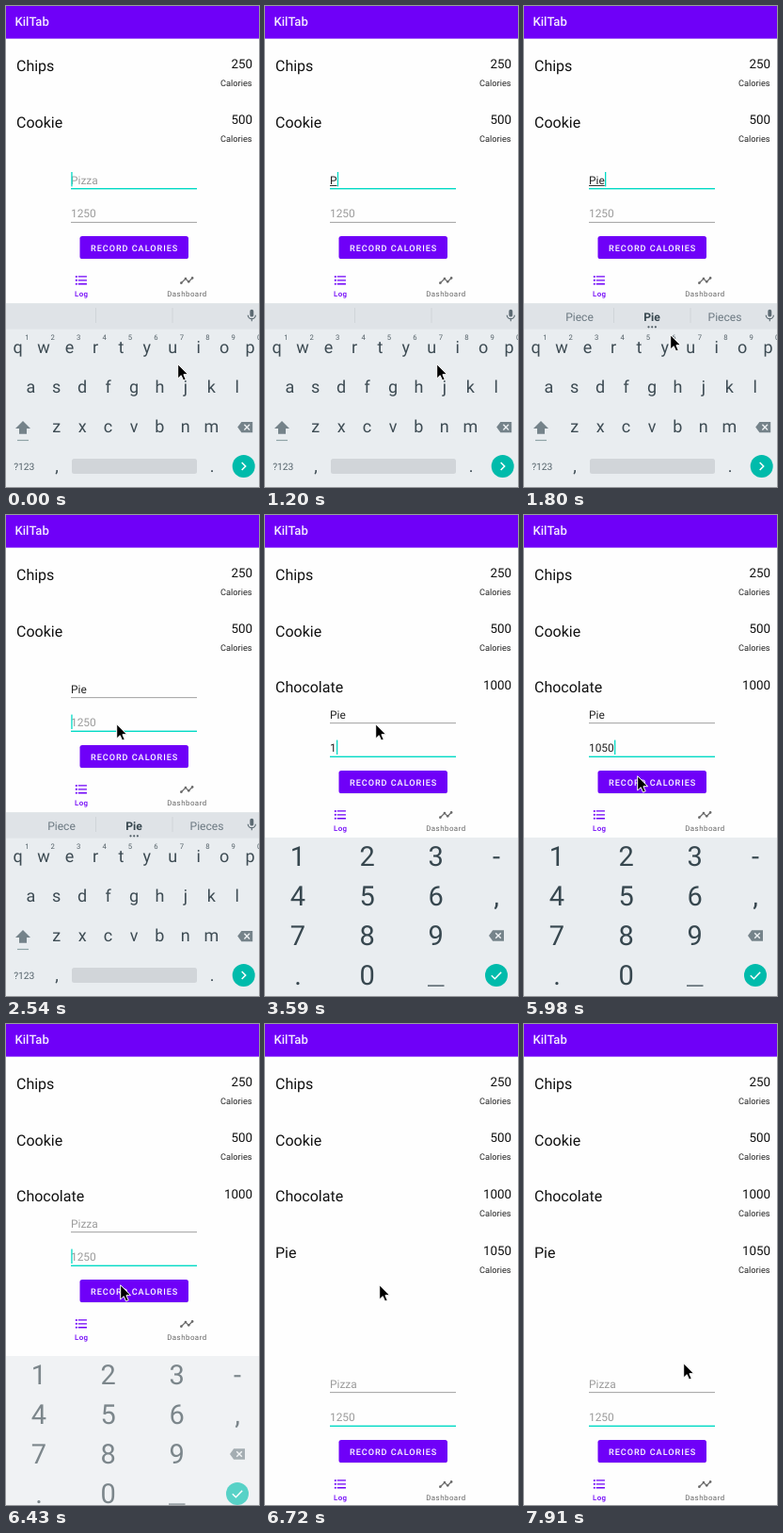
An HTML page that plays this animation: 269 by 510 pixels, repeating every 8000 ms.

```html
<!DOCTYPE html>
<html lang="en">
<head>
<meta charset="utf-8">
<title>Calorie log</title>
<style>
  html, body { margin: 0; width: 100%; height: 100%; overflow: hidden; background: #fefefe; }
  svg { display: block; width: 100vw; height: 100vh; font-family: Roboto, sans-serif; }
  text { white-space: pre; text-rendering: geometricPrecision; }
  .mid { text-anchor: middle; }
  .end { text-anchor: end; }
  .title { font-size: 13.1px; font-weight: 500; fill: #f4eaff; }
  .food { font-size: 16px; fill: #111; }
  .count { font-size: 13.4px; fill: #111; }
  .unit { font-size: 9.2px; fill: #222; }
  .entry { font-size: 11.9px; fill: #222; }
  .entry.hint { fill: #9b9b9b; }
  .action { font-size: 9.15px; font-weight: 500; letter-spacing: .95px; fill: #fff; }
  .tab { font-size: 7.9px; letter-spacing: .48px; fill: #666; }
  .tab.on { font-weight: 500; letter-spacing: .38px; fill: #6f00f8; }
  .key { font-size: 18px; fill: #3d4b53; }
  .sup { font-size: 7.7px; fill: #536067; }
  .sym { font-size: 10.3px; fill: #55636b; }
  .digit { font-size: 29px; fill: #37474f; }
  .sug { font-size: 12.1px; fill: #6c7982; }
  .sug.best { font-weight: 700; fill: #37474f; }
</style>
</head>
<body>
<svg viewBox="0 0 269 510" preserveAspectRatio="none">
  <defs>
    <g id="erase">
      <path d="M-8 0L-3.8-5.7H8V5.7H-3.8Z" fill="#75838a"/>
      <path d="M-.8-2.8L4.8 2.8M4.8-2.8L-.8 2.8" stroke="#eef1f3" stroke-width="1.4"/>
    </g>
  </defs>
  <rect width="269" height="510" fill="#fefefe"/>
  <g id="list"></g>
  <rect width="269" height="34.6" fill="#6f00f8"/>
  <text class="title" x="9.5" y="21">KilTab</text>

  <g id="form">
    <rect y="168" width="269" height="350" fill="#fefefe"/>
    <g id="fields"></g>
    <rect x="79" y="245" width="115" height="23.6" rx="2.6" fill="#000" opacity=".1"/>
    <rect id="button" x="78.5" y="244" width="115.5" height="24" rx="2.6" fill="#6f00f8"/>
    <text class="action" x="90" y="259.8">RECORD CALORIES</text>
    <g transform="translate(72.2 283) scale(.654)" fill="#6f00f8">
      <circle cx="4" cy="6" r="1.6"/><circle cx="4" cy="12" r="1.6"/><circle cx="4" cy="18" r="1.6"/>
      <path d="M7 5h14v2H7zM7 11h14v2H7zM7 17h14v2H7z"/>
    </g>
    <text class="tab on mid" x="80.2" y="308">Log</text>
    <g transform="translate(184.4 283.2) scale(.654)" fill="#6b6b6b">
      <path d="M3 16L10 9L15 14L21 8" fill="none" stroke="#6b6b6b" stroke-width="2"/>
      <circle cx="3" cy="16" r="2"/><circle cx="10" cy="9" r="2"/><circle cx="15" cy="14" r="2"/><circle cx="21" cy="8" r="2"/>
    </g>
    <text class="tab mid" x="192.4" y="308">Dashboard</text>
  </g>

  <g id="abc">
    <rect y="315.3" width="269" height="195" fill="#e9edf0"/>
    <rect y="315.3" width="269" height="27.3" fill="#dfe3e7"/>
    <path d="M95.5 320V336M177 320V336" stroke="#d0d5d9"/>
    <g id="sugs">
      <text class="sug mid" x="59" y="333.7">Piece</text>
      <text class="sug best mid" x="136" y="333.7">Pie</text>
      <text class="sug mid" x="213.5" y="333.7">Pieces</text>
      <g fill="#4b5961"><circle cx="132.5" cy="340.3" r="1.1"/><circle cx="136.2" cy="340.3" r="1.1"/><circle cx="139.9" cy="340.3" r="1.1"/></g>
    </g>
    <g transform="translate(253.5 320.5) scale(.65)">
      <rect x="9" y="2" width="6" height="12" rx="3" fill="#5c6a72"/>
      <path d="M5.8 11a6.2 6.2 0 0 0 12.4 0M12 17V21" fill="none" stroke="#5c6a72" stroke-width="1.8"/>
    </g>
    <g id="letters"></g>
    <path d="M18 440L26 448H22V453.8H14V448H10Z" fill="#75838a"/>
    <path d="M12 460.5H24" stroke="#8fa3a6" stroke-width="1.2"/>
    <use href="#erase" x="254.2" y="446.6"/>
    <text class="sym mid" x="19.3" y="491.8">?123</text>
    <rect x="70" y="480" width="133" height="16" rx="2.5" fill="#d1d5d9"/>
    <circle cx="252.7" cy="488" r="12" fill="#00bbab"/>
    <path d="M250.7 484L254.7 488L250.7 492" fill="none" stroke="#fff" stroke-width="1.5"/>
  </g>

  <g id="num">
    <rect y="342" width="269" height="180" fill="#e9edf0"/>
    <g id="digits"></g>
    <rect x="173" y="498.3" width="17.5" height="1.6" fill="#5c6a72"/>
    <use href="#erase" x="246" y="446"/>
    <circle cx="246" cy="488" r="12" fill="#00bbab"/>
    <path d="M240.8 488.3L244.4 491.8L251.2 484.8" fill="none" stroke="#fff" stroke-width="1.5"/>
  </g>

  <g id="mouse">
    <path transform="translate(.7 .8)" d="M0 0V15.2L3.5 11.9L5.9 17.3L8.5 16.1L6.2 10.9H10.9Z" fill="#000" stroke="#fff" stroke-width="1" stroke-linejoin="round"/>
  </g>
</svg>
<script>
const $ = id => document.getElementById(id);

function add(parent, tag, attrs, text = '') {
  const el = document.createElementNS('http://www.w3.org/2000/svg', tag);
  for (const k in attrs) el.setAttribute(k, attrs[k]);
  el.textContent = text;
  parent.append(el);
  return el;
}
const label = (parent, cls, x, y, text) => add(parent, 'text', { class: cls, x, y }, text);

[['Chips', 250], ['Cookie', 500], ['Chocolate', 1000], ['Pie', 1050]].forEach(([food, kcal], i) => {
  const y = i * 59.8;
  label($('list'), 'food', 11, 68.8 + y, food);
  label($('list'), 'count end', 262, 65.6 + y, kcal);
  label($('list'), 'unit end', 261.5, 84.6 + y, 'Calories');
});

const PITCH = 27.43;
['qwertyuiop', 'asdfghjkl', 'zxcvbnm'].forEach((row, r) => {
  [...row].forEach((c, i) => {
    const x = [12.7, 26.3, 53.7][r] + i * PITCH;
    label($('letters'), 'key mid', x, 368.3 + r * 42, c);
    if (!r) label($('letters'), 'sup mid', x + 9.6, 354, (i + 1) % 10);
  });
});
label($('letters'), 'key mid', 54, 493.5, ',');
label($('letters'), 'key mid', 219, 493.5, '.');

['123-', '456,', '789', '.0'].forEach((row, r) =>
  [...row].forEach((c, i) => label($('digits'), 'digit mid', [35, 108.7, 181.7, 246][i], 372.2 + r * 42, c)));

const ACCENT = '#03dac5';
function makeField(hint, y) {
  const g = add($('fields'), 'g', { transform: `translate(69 ${y})` });
  const line = add(g, 'rect', { width: 134 });
  const under = add(g, 'rect', { y: 5.9, height: 1, fill: '#333' });
  const text = label(g, 'entry', 0, 4.6, '');
  const caret = add(g, 'rect', { y: -8.1, width: 1.3, height: 15.4, fill: ACCENT });
  return (value, focus, caretOn, composing) => {
    text.textContent = value || hint;
    text.setAttribute('class', value ? 'entry' : 'entry hint');
    const w = value ? text.getComputedTextLength() : 0;
    under.setAttribute('width', composing ? w : 0);
    caret.setAttribute('x', w + .3);
    caret.style.opacity = focus && caretOn ? 1 : 0;
    line.setAttribute('y', focus ? 8.9 : 9.2);
    line.setAttribute('height', focus ? 1.4 : .8);
    line.setAttribute('fill', focus ? ACCENT : '#8a8a8a');
  };
}
const foodField = makeField('Pizza', 184.1);
const kcalField = makeField('1250', 219.7);

// Each step overrides part of the state from its time on.
const LOOP = 8000;
const steps = [
  [0, { food: '', kcal: '', focus: 0, caret: 1, shift: 0, board: 'abc', drop: 0, fade: 1, sugs: 0, press: 0, mouse: [182, 379] }],
  [150, { caret: 0 }],
  [1200, { food: 'P', caret: 1 }],
  [1350, { food: 'Pi' }],
  [1500, { food: 'Pie', sugs: 1 }],
  [1650, { mouse: [175, 372] }],
  [1800, { mouse: [155, 348] }],
  [1950, { mouse: [130, 282] }],
  [2100, { mouse: [118, 226] }],
  [2250, { mouse: [117, 221], focus: 1 }],
  [2690, { board: 'num', shift: 27, caret: 0 }],
  [3140, { caret: 1 }],
  [3590, { kcal: '1' }],
  [4040, { kcal: '10' }],
  [4490, { caret: 0 }],
  [4640, { kcal: '105', caret: 1 }],
  [4780, { kcal: '1050' }],
  [5230, { caret: 0 }],
  [5380, { mouse: [117, 228] }],
  [5530, { mouse: [118, 246] }],
  [5680, { mouse: [119, 266], caret: 1 }],
  [5830, { mouse: [120, 276] }],
  [6130, { mouse: [121, 276], press: 1, caret: 0 }],
  [6280, { food: '', kcal: '', caret: 1 }],
  [6430, { press: 0, drop: 10, fade: .65 }],
  [6570, { board: '', shift: 197 }],
  [6720, { caret: 0 }],
  [7170, { caret: 1 }],
  [7470, { mouse: [130, 345] }],
  [7620, { mouse: [144, 423], caret: 0 }],
  [7760, { mouse: [160, 390] }],
  [7910, { mouse: [169, 359] }],
];

let shown = -1;
function draw(now) {
  const t = now % LOOP;
  const past = steps.filter(([at]) => at <= t);
  if (past.length !== shown) {
    shown = past.length;
    const s = Object.assign({}, ...past.map(p => p[1]));
    foodField(s.food, s.focus === 0, s.caret, s.focus === 0);
    kcalField(s.kcal, s.focus === 1, s.caret, false);
    $('form').setAttribute('transform', `translate(0 ${s.shift})`);
    $('button').setAttribute('fill', s.press ? '#8a33fa' : '#6f00f8');
    $('abc').style.display = s.board === 'abc' ? '' : 'none';
    $('num').style.display = s.board === 'num' ? '' : 'none';
    $('num').setAttribute('transform', `translate(0 ${s.drop})`);
    $('num').style.opacity = s.fade;
    $('sugs').style.display = s.sugs ? '' : 'none';
    $('mouse').setAttribute('transform', `translate(${s.mouse})`);
  }
  requestAnimationFrame(tick);
}
const tick = () => draw(performance.now());
tick();
</script>
</body>
</html>
```
